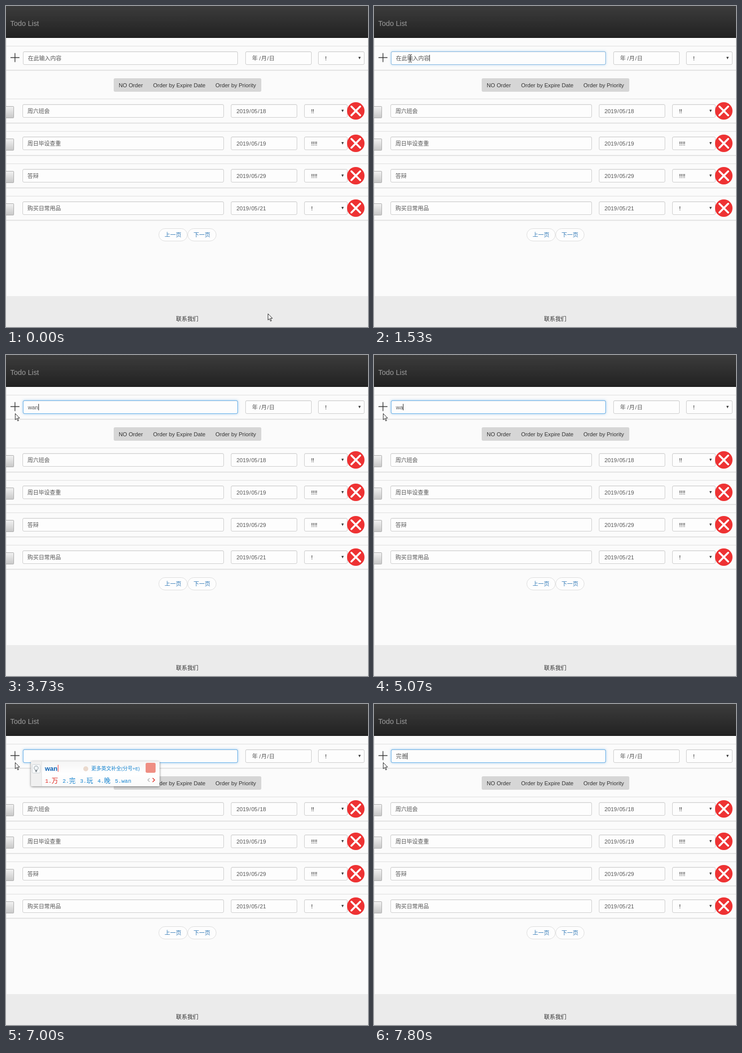
Write an HTML page that moves like this. It is 726 px wide and 644 px high and loops after 8000 ms.

```html
<!DOCTYPE html>
<html lang="zh-CN">
<head>
<meta charset="utf-8">
<title>Todo List</title>
<style>
  html, body { margin: 0; width: 100%; height: 100%; overflow: hidden; }
  body { position: relative; background: #fbfbfb; color: #333;
    font: 11.2px/20px "Liberation Sans", "Noto Sans CJK SC", "Noto Sans CJK", sans-serif; }
  div, svg { position: absolute; left: 0; top: 0; box-sizing: border-box; white-space: pre; }
  #stage { width: 726px; height: 644px; overflow: hidden; }
  .edge { border-left: 1px solid #e4e4e4; }
  .nav { background: linear-gradient(#3c3c3c, #222); border-bottom: 1px solid #0c0c0c; }
  .brand { color: #9d9d9d; font-size: 14.4px; }
  .panel { border: solid #ddd; border-width: 1px 0; box-shadow: 0 1px 1px rgba(0,0,0,.07); }
  .field { background: #fdfdfd; border: 1px solid #ccc; border-radius: 3px;
    box-shadow: inset 0 1px 1px rgba(0,0,0,.06); }
  .value { color: #555; }
  .value b { font-weight: 400; padding: 0 .8px; }
  .level { color: #222; }
  .arrow { background: #444; clip-path: polygon(0 0, 100% 0, 50% 100%); }
  .check { background: linear-gradient(#f1f1f1, #c9c9c9); border: 1px solid #aaa; border-left: 0; border-radius: 0 2px 2px 0; }
  .group { background: #d6d6d6; border-radius: 3px; }
  .pill { background: #fdfdfd; border: 1px solid #ddd; border-radius: 13px; }
  .link { color: #337ab7; }
  .footer { background: #ebebeb; }
  #focus { border: 1px solid #66afe9; border-radius: 3px; box-shadow: 0 0 5px rgba(102,175,233,.6); }
  #typed.sel span { background: #39f; color: #fff; display: inline-block; line-height: 13px; }
  #caret { display: inline-block; width: 1px; height: 13px; background: #222; vertical-align: -2.5px; margin-right: -1px; }
  #ime { left: 50px; top: 115px; height: 50px; background: linear-gradient(#f5f5f5, #fff 48%, #fafafa);
    border-radius: 3px; box-shadow: 0 1px 4px rgba(0,0,0,.5); }
  .strip { background: #f0f0f0; border-right: 1px solid #e2e2e2; border-radius: 3px 0 0 3px; }
  #spell { font-weight: 700; font-size: 13px; color: #0c62b4; }
  #spell i { display: inline-block; width: 1px; height: 14px; background: #e33; vertical-align: -2px; margin-left: 1px; }
  .cand { color: #1583cf; font-size: 13px; }
  .cand.first { color: #e0241c; }
  .cand b { font: 10.9px "Liberation Mono", monospace; }
  #hint { color: #1583cf; font-size: 10px; }
  #hint b { font-size: 9px; font-weight: 400; }
  #hint::before { content: ""; position: absolute; left: -16px; top: 5px; width: 10px; height: 10px;
    border-radius: 50%; background: #ead9cd; }
  #badge { width: 20px; height: 20px; top: 3px; border-radius: 3px; background: #ef8e83; }
</style>
</head>
<body>
<div id="stage"></div>
<script>
const stage = document.getElementById('stage');
const box = (cls, x, y, w, h) =>
  `<div class="${cls}" style="left:${x}px;top:${y}px;width:${w}px;height:${h}px"></div>`;
const text = (cls, x, mid, s, id = '') =>
  `<div class="${cls}" ${id && `id="${id}"`} style="left:${x}px;top:${mid - 10}px">${s}</div>`;
const select = (x, y, w, level) => box('field', x, y, w, 27) +
  text('level', x + 14, y + 13.5, '!'.repeat(level)) + box('arrow', x + w - 12.5, y + 11, 5, 5);
const date = s => s.split('/').map(p => `<b>${p}</b>`).join('/');

const row = ([title, day, level], i) => {
  const y = 186 + 65 * i;
  return box('panel', 0, y, 726, 49) + box('check', 0, y + 15, 16, 24) +
    box('field', 33, y + 11, 404, 27) + text('value', 43, y + 24.5, title) +
    box('field', 451, y + 11, 133, 27) + text('value', 461.5, y + 24.5, date('2019/05/' + day)) +
    select(598, y + 11, 87, level) +
    `<svg style="left:684px;top:${y + 7}px" width="35" height="35">
      <circle cx="17.5" cy="17.5" r="17.5" fill="#ee3233"/>
      <path d="M8.7 8.7L26.3 26.3M26.3 8.7L8.7 26.3" stroke="#fff" stroke-width="3.8" stroke-linecap="round"/></svg>`;
};

stage.innerHTML =
  box('edge', 0, 64, 1, 518) + box('nav', 0, 0, 726, 64) + text('brand', 8.5, 35, 'Todo List') +
  box('panel', 0, 80, 726, 49) +
  `<svg style="left:8px;top:93px" width="20" height="20">
    <path d="M1 10.5H19M10 1.5V19.5" stroke="#333" stroke-width="1.4"/></svg>` +
  box('field', 34, 91, 431, 27) + '<div id="focus" style="left:34px;top:91px;width:431px;height:27px"></div>' +
  text('value', 44, 104.5, '<span></span><i id="caret"></i>', 'typed') +
  box('field', 480, 91, 133, 27) + text('value', 493.5, 104.5, '年 /<b>月</b>/<b>日</b>') +
  select(626, 91, 93, 1) +
  box('group', 216, 145, 296, 27) + text('', 226, 158.5, 'NO Order') +
  text('', 295, 158.5, 'Order by Expire Date') + text('', 420, 158.5, 'Order by Priority') +
  [['周六班会', 18, 2], ['周日毕设查重', 19, 4], ['答辩', 29, 4], ['购买日常用品', 21, 1]].map(row).join('') +
  box('pill', 306, 446, 58, 26) + box('pill', 363.5, 446, 58, 26) +
  text('link', 318, 458.5, '上一页') + text('link', 376, 458.5, '下一页') +
  box('footer', 0, 582, 726, 62) + text('', 341, 628, '联系我们') +
  `<div id="ime">${box('strip', 0, 0, 22, 50)}
    <svg style="left:2px;top:6px" width="17" height="18">
      <rect x=".5" y=".5" width="16" height="17" rx="2" fill="#f7f9fa" stroke="#ccd2d6"/>
      <circle cx="8.5" cy="7.5" r="4.2" fill="#eef2f4" stroke="#8c979e"/>
      <path d="M6.5 12.5H10.5M7 14.5H10" stroke="#6f7a80" stroke-width="1.5"/></svg>
    ${text('', 28, 15, '', 'spell')}<div id="cands"></div>
    ${text('', 121, 15, '更多英文补全<b>(</b>分号<b>+E)</b>', 'hint')}
    <div id="badge"></div>
    <svg id="pages" style="top:32px" width="20" height="11" fill="none" stroke-width="1.7">
      <path d="M6 2L2.5 5.5 6 9" stroke="#bbb"/><path d="M12 1.5L16 5.5 12 9.5" stroke="#e33a32"/></svg>
  </div>
  <svg id="arrow" width="12" height="18"><path d="M.5 .5V13L3.4 10.3 5.5 15.3 7.4 14.5 5.3 9.6H9.3Z" fill="#fff" stroke="#222"/></svg>
  <svg id="beam" width="7" height="16"><path d="M0 .5H3M4 .5H7M3.5 1V15M0 15.5H3M4 15.5H7" stroke="#333"/></svg>`;

const $ = id => document.getElementById(id);
const [typed, caret, focusRing, ime, arrow, beam] =
  ['typed', 'caret', 'focus', 'ime', 'arrow', 'beam'].map($);

const LOOP = 8000, TICK = 200 / 3;
const path = [[0, 525, 617], [267, 400, 230], [533, 400, 230], [867, 238, 132],
  [1133, 72, 105], [1800, 72, 105], [2133, 27, 116], [2400, 18, 117]];
const typing = [[0, '在此输入内容'], [3470, 'w'], [3530, 'wa'], [3730, 'wan'],
  [5070, 'wa'], [5270, 'w'], [5330, ''], [7800, '完善']];
// time, spelling, right edge, candidates
const one = '我为未位⑤', phrases = '完善 晚上 完事 玩耍 万事';
const lookup = [[5730, 'w', 308, one], [6000, 'w', 293, one],
  [6200, 'wa', 318, '挖哇瓦娃蛙'], [6730, 'wan', 308, '万 完 玩 晚 wan'],
  [7070, 'wans', 348, phrases], [7200, 'wansh', 348, phrases],
  [7330, 'wansha', 348, phrases], [7470, 'wanshan', 348, phrases]];

const latest = (list, t) => list.filter(e => e[0] <= t).pop();

function pointer(t) {
  const q = Math.floor((t + 4) / TICK) * TICK;
  const i = path.findIndex(p => p[0] > q);
  if (i < 0) return path[path.length - 1].slice(1);
  const [a, b] = [path[i - 1], path[i]], k = (q - a[0]) / (b[0] - a[0]);
  return [1, 2].map(n => Math.round(a[n] + (b[n] - a[n]) * k));
}

function place(el, x, y, show) {
  el.style.transform = `translate(${x}px,${y}px)`;
  el.style.visibility = show ? 'visible' : 'hidden';
}

let shown;
function showLookup(entry) {
  if (entry === shown) return;
  shown = entry;
  const [, spell, right, list] = entry;
  const words = list.includes(' ') ? list.split(' ') : [...list];
  const pitch = list === phrases ? 48 : 35;
  ime.style.width = right - 50 + 'px';
  $('spell').innerHTML = spell + '<i></i>';
  $('hint').hidden = spell !== 'wan';
  $('badge').style.left = right - 78 + 'px';
  $('pages').style.left = right - 76 + 'px';
  $('cands').innerHTML = words.map((w, i) => text(i ? 'cand' : 'cand first', 28.5 + pitch * i, 38.5,
    `<b>${i + 1}.${/\w/.test(w) ? w + '</b>' : '</b>' + w}`)).join('');
}

function draw(t) {
  const [x, y] = pointer(t);
  const inside = x > 34 && x < 466 && y > 91 && y < 118;
  place(arrow, x, y, !inside);
  place(beam, x - 3, y - 8, inside);

  focusRing.style.opacity = Math.max(0, Math.min(1, (t - 1420) / 150));
  const [since, value] = latest(typing, t);
  const selected = t >= 1600 && t < 3470;
  typed.firstChild.textContent = value;
  typed.className = selected ? 'value sel' : 'value';

  const composing = t >= 5730 && t < 7800;
  const blinkOn = Math.floor((t - since + 2) / 532) % 2 === 0;
  const caretOn = t >= 1470 && !selected && !composing && (t < 1600 || blinkOn);
  caret.style.visibility = caretOn ? 'visible' : 'hidden';

  ime.style.visibility = composing ? 'visible' : 'hidden';
  if (composing) {
    ime.style.opacity = Math.min(1, (t - 5600) / 260);
    showLookup(latest(lookup, t));
  }
}

let start;
function frame(now) {
  start ??= now;
  draw((now - start) % LOOP);
  requestAnimationFrame(frame);
}
draw(0);
requestAnimationFrame(frame);
</script>
</body>
</html>
```
